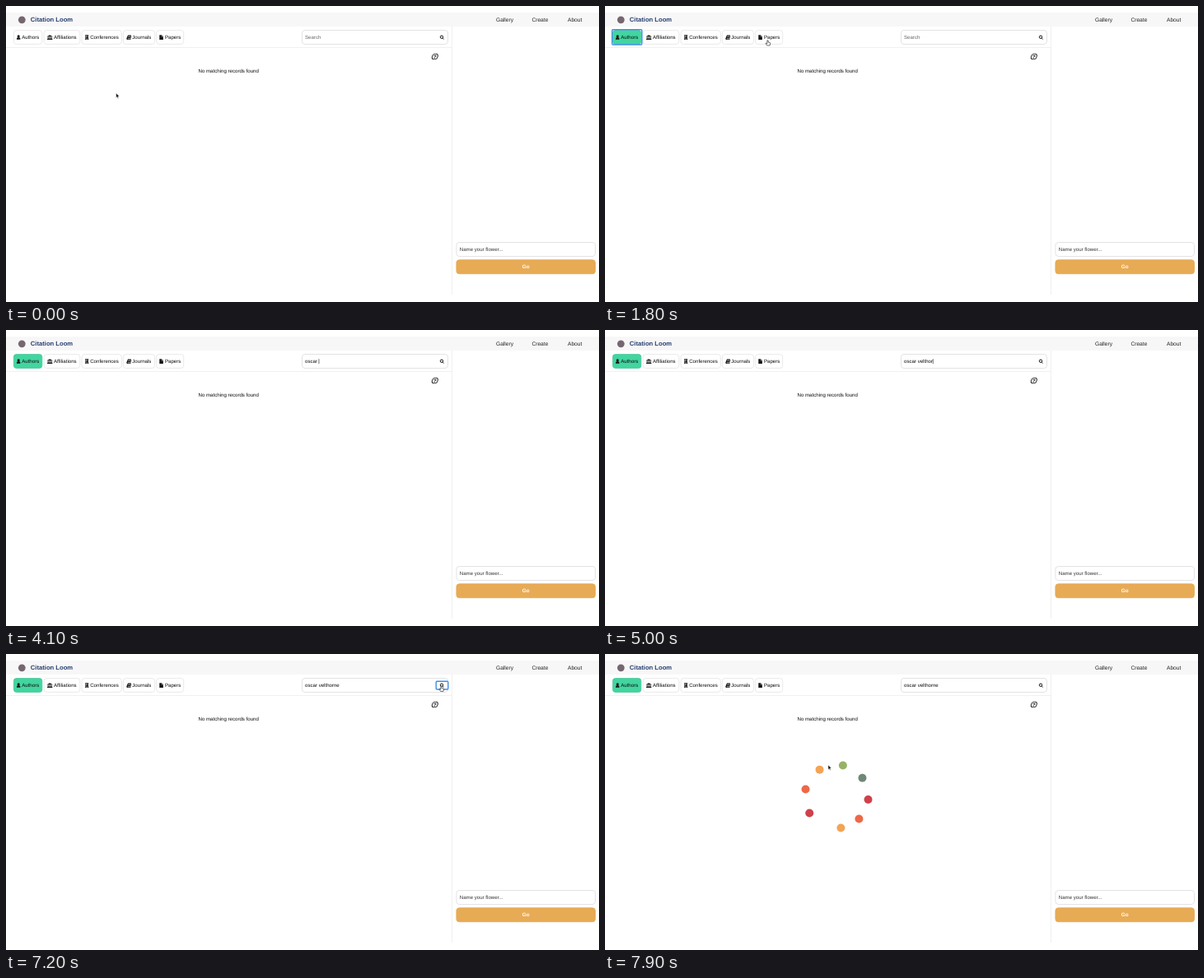
Animation, 720 px wide and 360 px high, one loop 8 s. Source, as an HTML page:

```html
<!DOCTYPE html>
<html lang="en">
<head>
<meta charset="utf-8">
<title>Author search</title>
<style>
  html, body { margin: 0; width: 100%; height: 100%; overflow: hidden; background: #fff; }
  svg { display: block; width: 720px; height: 360px; }
  text {
    font: 6.12px "Liberation Sans", Arial, sans-serif;
    fill: #0c0c0c; white-space: pre; text-rendering: geometricPrecision;
  }
  .nav { font-size: 6.65px; fill: #222; }
  .brand { font-size: 7.65px; font-weight: bold; fill: #273f70; }
  .go { font-size: 6.3px; font-weight: bold; fill: #fff; text-anchor: middle; }
  .soft { fill: #666; }
  .field { fill: #fff; stroke: #dcdcdc; stroke-width: .8; }
  .tab { fill: #fff; stroke: #e4e4e4; stroke-width: .8; }
  .tab.on { fill: #42d5a0; stroke: #4cc39b; }
  .rule { stroke: #f0f0f0; stroke-width: 1; }
  .icon { fill: #151515; }
  .line { fill: none; stroke: #151515; }
  .help { font-size: 6.2px; font-weight: bold; text-anchor: middle; }
  .ring { fill: none; stroke: #3f8fe6; stroke-width: 1.4; }
</style>
</head>
<body>
<svg viewBox="0 0 720 360">
  <rect y="8" width="720" height="17" fill="#f7f7f7"/>
  <circle cx="19.3" cy="16.8" r="4.4" fill="#75666f"/>
  <text class="brand" x="29.8" y="19.2">Citation Loom</text>
  <text class="nav" x="595" y="18.8">Gallery</text>
  <text class="nav" x="638.4" y="18.8">Create</text>
  <text class="nav" x="682" y="18.8">About</text>
  <path class="rule" d="M0 50.5H541M541.5 25V351"/>

  <g id="tabs"></g>
  <g class="icon">
    <path d="M15.2 35.3a1.5 1.5 0 0 1 0 3.1a1.5 1.5 0 0 1 0-3.1zM13 40.8v-1.2q0-1.3 1.2-1.4q1 .6 2 0q1.2.1 1.2 1.4v1.2z"/>
    <path d="M50 36.9l3.2-1.7l3.2 1.7v.6H50zM50.7 37.9h1v2h-1zM52.7 37.9h1v2h-1zM54.7 37.9h1v2h-1zM50.3 39.8h5.8v.5h.4v.6h-6.6v-.6h.4z"/>
    <path fill-rule="evenodd" d="M96 35.3h4.4v.5H100v4.6h.4v.5H96v-.5h.4v-4.6H96zM97.2 36.3v.7h.7v-.7zM98.5 36.3v.7h.7v-.7zM97.2 37.6v.7h.7v-.7zM98.5 37.6v.7h.7v-.7zM97.8 39.3v1.6h.8v-1.6z"/>
    <path fill-rule="evenodd" d="M148 35.4h4l-.9 4.2h-3.2q-.6.4 0 .7h3.4l.9-3.8l.2.2l-1 4.2h-4.3q-1.1-.4-.8-1.4zM148.7 36.4l-.1.4h2.2l.1-.4zM148.4 37.5l-.1.4h2.2l.1-.4z"/>
    <path d="M186.3 35.2h2.6v2h2v3.7h-4.6zM189.3 35.2l1.6 1.6h-1.6z"/>
  </g>

  <rect class="field" x="359.5" y="29.5" width="177" height="17" rx="3.5"/>
  <text id="query" x="363" y="40.2"></text>
  <path id="caret" class="line" stroke-width=".6" d="M0 35.2V41.2"/>
  <g class="line">
    <circle cx="529" cy="37.7" r="1.7"/>
    <path d="M530.2 39l1.4 1.4"/>
  </g>
  <g transform="translate(520.8 61.5) skewX(-14)">
    <circle class="line" r="3.4" stroke-width=".9"/>
    <text class="help" y="2.2">?</text>
  </g>
  <text x="233.5" y="81.2">No matching records found</text>

  <rect class="field" x="546.9" y="287.5" width="168.6" height="17" rx="3.5"/>
  <text x="550.8" y="298.3" style="fill:#333">Name your flower...</text>
  <rect x="546.9" y="308.8" width="168.6" height="16.9" rx="3.5" fill="#e8ab55" stroke="#e3a650" stroke-width=".8"/>
  <text class="go" x="631.2" y="319.4">Go</text>

  <rect id="tabRing" class="ring" x="8.6" y="28.8" width="36.2" height="18.2" rx="1"/>
  <rect id="findRing" class="ring" x="522.2" y="33.2" width="14.6" height="9.8" rx="1"/>
  <g id="spinner"></g>

  <g id="arrow" fill="#111" stroke="#fff" stroke-width=".4">
    <path d="M0 0V5.6L1.3 4.4L2.1 6.4L3 6L2.2 4.1H3.9Z"/>
  </g>
  <g id="hand" fill="#fff" stroke="#111" stroke-width=".6" stroke-linejoin="round">
    <path d="M-.6 .3Q0-.5 .6 .3V2.4L2.8 2.9Q3.4 3.1 3.2 4L2.6 6.4H-.8L-2.4 4Q-2.4 3.2-1.6 3.5L-.6 4.2Z"/>
  </g>
  <g id="beam" class="line" stroke-width=".6">
    <path d="M-1.2-3H-.5Q0-3 0-2.4Q0-3 .5-3H1.2M0-2.4V2.4M-1.2 3H-.5Q0 3 0 2.4Q0 3 .5 3H1.2M-.7 .8H.7"/>
  </g>
</svg>
<script>
const LOOP = 8000, STEP = 100;
const NAME = "oscar velthorne";
const $ = id => document.getElementById(id);
const show = (id, on) => $(id).setAttribute("visibility", on ? "visible" : "hidden");

function add(parent, tag, attrs, text = "") {
  const el = document.createElementNS("http://www.w3.org/2000/svg", tag);
  for (const key in attrs) el.setAttribute(key, attrs[key]);
  el.textContent = text;
  $(parent).append(el);
  return el;
}

// label, left, right, text x
const tabs = [
  ["Authors", 9.4, 43.8, 19.2], ["Affiliations", 46.2, 89.8, 57.9],
  ["Conferences", 92.1, 140.3, 102.2], ["Journals", 142.4, 180.6, 153.3],
  ["Papers", 182.7, 215.7, 193]
].map(([label, left, right, x]) => {
  const box = add("tabs", "rect", { class: "tab", x: left, y: 29.6, width: right - left, height: 16.8, rx: 3.2 });
  add("tabs", "text", { x, y: 40.2 }, label);
  return box;
});

const colors = ["#cf414a", "#ee6847", "#f3a455", "#98b265", "#6f8878"];
const dots = Array.from({ length: 8 }, (_, i) => add("spinner", "circle", { r: 5, fill: colors[i % 5] }));

// time, x, y of the pointer
const path = [
  [0, 133.7, 106], [200, 133.7, 106], [900, 28, 39], [1200, 28, 39],
  [1700, 197.5, 41.6], [1900, 197.5, 41.6], [2600, 367.4, 38.2],
  [6300, 367.4, 38.2], [7000, 528.4, 39], [7300, 528.4, 39],
  [7700, 271, 135], [LOOP, 271, 135]
];

function pointerAt(t) {
  const i = path.findIndex(p => p[0] > t);
  const [t0, x0, y0] = path[i - 1], [t1, x1, y1] = path[i];
  const k = (t - t0) / (t1 - t0), e = k * k * (3 - 2 * k);
  return [x0 + (x1 - x0) * e, y0 + (y1 - y0) * e];
}

function drawPointer(t) {
  const [x, y] = pointerAt(t);
  const inBar = y > 29.5 && y < 46.5;
  const kind = inBar && (x > 9 && x < 216 || x > 521 && x < 537) ? "hand"
    : inBar && x > 359 && x < 522 ? "beam" : "arrow";
  const hidden = t >= 3400 && t < 6300;
  for (const id of ["arrow", "hand", "beam"]) show(id, !hidden && id === kind);
  $(kind).setAttribute("transform", `translate(${x} ${y})`);
}

function drawQuery(t) {
  const count = Math.max(0, Math.min(NAME.length, Math.floor((t - 3400) / 115)));
  const query = $("query");
  query.textContent = count ? NAME.slice(0, count) : "Search";
  query.setAttribute("class", count ? "" : "soft");
  const typing = t >= 3400 && t < 5200;
  const start = t < 3400 ? 2800 : 5000;
  const lit = typing || Math.floor((t - start) / 500) % 2 === 0;
  show("caret", t >= 2800 && t < 7100 && lit);
  const x = 363.3 + (count ? query.getComputedTextLength() : 0);
  $("caret").setAttribute("transform", `translate(${x} 0)`);
}

const easeInOut = k => k < .5 ? 4 * k ** 3 : 1 - 4 * (1 - k) ** 3;

// each dot makes the same eased turn, a little after the one before
function drawSpinner(t) {
  show("spinner", t >= 7400);
  dots.forEach((dot, i) => {
    const p = (t - 7900) / 1000 - .035 * i;
    const a = (238.3 + 45 * i + 360 * easeInOut(p - Math.floor(p))) * Math.PI / 180;
    dot.setAttribute("cx", 281.1 + 38.6 * Math.sin(a));
    dot.setAttribute("cy", 173.3 - 38.6 * Math.cos(a));
  });
}

function draw(now) {
  const t = Math.floor(now % LOOP / STEP) * STEP;
  tabs[0].classList.toggle("on", t >= 1100);
  show("tabRing", t >= 1100 && t < 2800);
  show("findRing", t >= 7100 && t < 7400);
  drawQuery(t);
  drawSpinner(t);
  drawPointer(t);
}

const begin = performance.now();
function tick() {
  draw(performance.now() - begin);
  requestAnimationFrame(tick);
}
tick();
</script>
</body>
</html>
```
